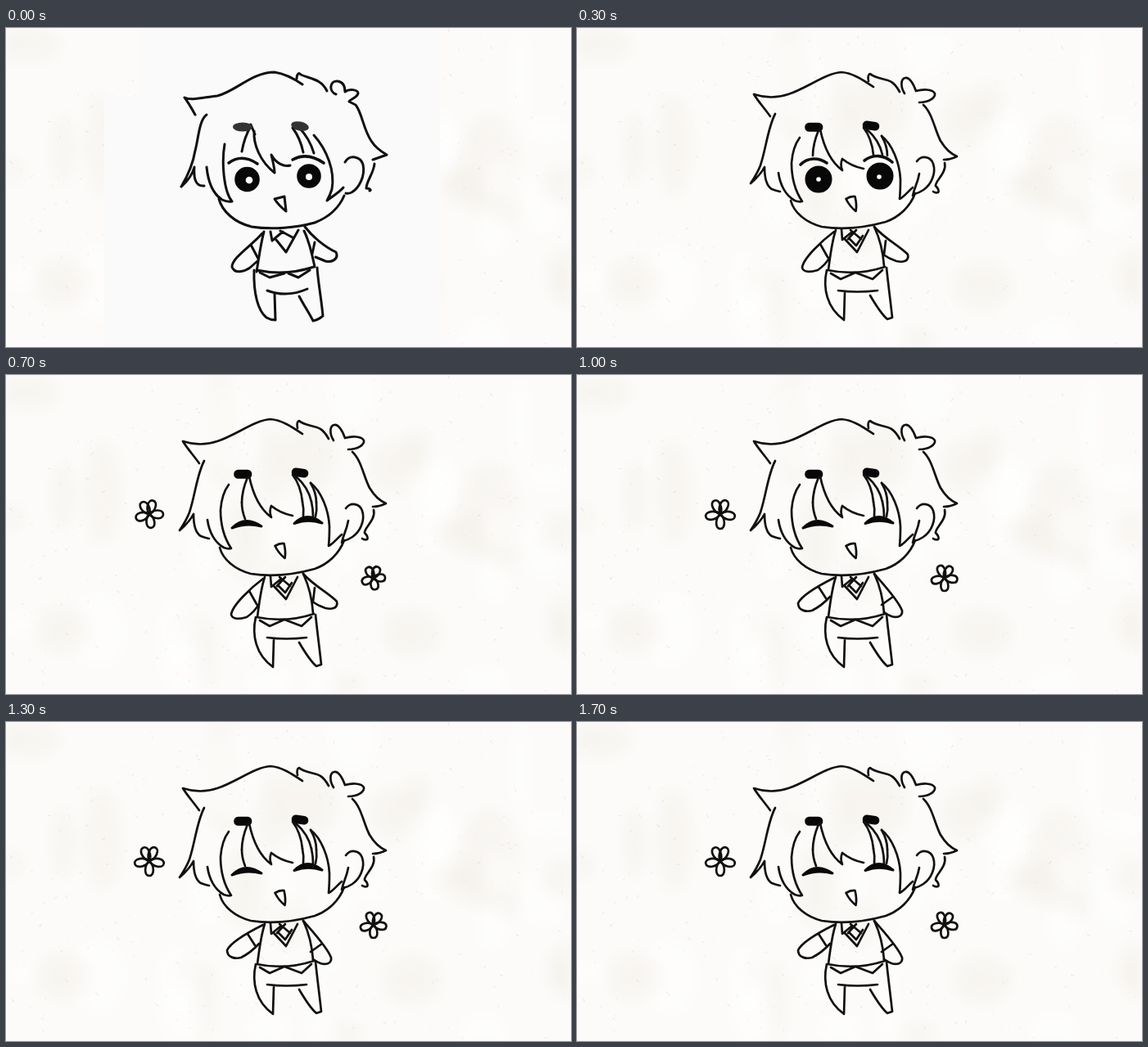
Write an HTML page that moves like this. It is 690x390 px and loops after 1800 ms.

```html
<!DOCTYPE html>
<html lang="en">
<head>
<meta charset="utf-8">
<title>Waving chibi</title>
<style>
  html, body { margin: 0; width: 100%; height: 100%; overflow: hidden; background: #fcfbf9; }
  svg { display: block; width: 690px; height: 390px; }
  #ink { fill: none; stroke: #101010; stroke-width: 2.7; stroke-linecap: round; stroke-linejoin: round; filter: url(#soft); }
  #rough { stroke-width: 3; }
  .solid { fill: #080808; stroke: #080808; stroke-width: 1.6; }
  .lid { stroke-width: 3.6; }
  .glint { fill: #fcfbf9; stroke: none; }
  .brow { fill: #333; stroke: none; }
  #ink [data-part] { display: none; }
  #clean { fill: #fafafa; }
</style>
</head>
<body>
<svg viewBox="0 0 690 390">
  <defs>
    <filter id="soft" x="0" y="0" width="690" height="390" filterUnits="userSpaceOnUse">
      <feGaussianBlur stdDeviation=".75"/>
    </filter>
    <filter id="haze" x="0" y="0" width="690" height="390" filterUnits="userSpaceOnUse">
      <feGaussianBlur stdDeviation="9"/>
    </filter>
  </defs>
  <g id="stains" filter="url(#haze)"></g>
  <g id="paper"></g>
  <path id="clean" d="M162 0H530V390H120V85H162Z"/>
  <g id="ink">

    <!-- rough sketch pose -->
    <g id="rough" data-part="rough">
      <path d="M231 106C226 97 222 90 218 85C226 89 240 85 258 83C280 78 300 54 328 54C341 56 352 62 362 69"/>
      <path d="M355 62C355 56 358 54 360 57C371 62 385 62 392 77"/>
      <path d="M403 81C394 78 395 64 405 65C412 66 414 72 414 78C419 74 430 75 430 80C428 86 420 87 419 90L427 94C435 104 436 123 446 138C451 146 458 151 465 155L448 161"/>
      <path d="M450 166C449 178 440 187 440 196C444 196 447 198 444 199"/>
      <path d="M245 106C236 112 235 135 231 150C228 168 220 184 214 194C222 187 228 178 230 170C229 183 231 194 242 193"/>
      <path d="M245 170C247 190 253 203 264 210Q270 213 276 212C266 200 263 165 267 142"/>
      <path d="M260 209C264 224 279 238 300 243C325 247 355 244 377 238C395 231 407 219 413 205"/>
      <path d="M414 164C420 154 433 157 436 167C439 181 431 196 422 201Q418 203 415 202"/>
      <path d="M376 131C392 149 402 175 398 197Q396 204 392 211C400 205 408 200 412 195"/>
      <path d="M299 118L304 130M303 126C302 142 310 163 328 177C328 170 325 160 324 155C330 166 340 170 347 168"/>
      <path d="M299 120C293 130 290 140 288 151M350 122C358 133 361 142 363 152M358 122C368 132 373 143 376 153"/>
      <ellipse class="brow" cx="289" cy="121" rx="12" ry="5.5"/>
      <ellipse class="brow" cx="359" cy="120" rx="11" ry="5.5" transform="rotate(12 359 120)"/>
      <path class="lid" d="M272 165Q288 153 307 166M350 161Q368 151 388 165"/>
      <circle class="solid" cx="294.500" cy="185" r="14.500"/>
      <circle class="solid" cx="370" cy="181" r="14"/>
      <circle class="glint" cx="297" cy="186" r="4.300"/>
      <circle class="glint" cx="370" cy="182" r="4"/>
      <path d="M328 209L340 206L342 224Q333 217 328 209Z"/>
      <path d="M323 249L325 260L338 249M330 259L342 274L357 247M335 248L350 256"/>
      <path d="M315 249C311 264 309 280 306 298M364 248C371 262 374 278 377 292M306 296C330 301 355 299 376 292"/>
      <path d="M310 299L322 305L340 300M345 300L357 305L371 296"/>
      <path d="M313 251C300 266 276 281 276 292C279 301 291 298 298 293L307 285M299 265L308 282"/>
      <path d="M365 243C375 256 390 268 403 274C407 283 397 287 390 285L378 280M377 262L374 276"/>
      <path d="M303 296C302 325 308 346 318 354Q323 357 329 357L328 325M319 321C335 327 352 326 368 319"/>
      <path d="M358 328C365 341 371 350 375 358Q381 357 387 352C385 330 381 310 380 293"/>
    </g>

    <!-- clean figure -->
    <g data-part="figure">
      <path d="M236 108C228 97 220 88 216 81C228 85 244 86 258 81C280 74 304 55 323 54C337 55 350 64 362 72"/>
      <path d="M356 65C355 60 355 57 358 56C364 62 378 62 384 66Q389 69 394 78"/>
      <path d="M400 80C395 72 395 62 401 61C407 60 411 69 414 77C421 75 434 74 437 80C438 85 430 91 418 91"/>
      <path d="M423 94C434 104 437 125 444 138C450 148 457 154 464 157Q456 161 448 161M449 165C452 177 437 187 438 193Q443 198 441 201Q438 202 435 200"/>
      <path d="M242 105C233 122 231 147 224 168C221 176 216 184 212 190C219 184 226 176 229 170C229 182 231 193 238 197Q243 199 248 200"/>
      <path d="M246 177C248 192 255 205 266 211Q271 213 275 212C267 200 262 185 262 165C263 152 266 142 272 134"/>
      <path d="M261 211C265 226 280 238 299 243C325 247 352 244 377 237C394 231 407 218 413 202"/>
      <path d="M415 163C421 155 432 157 435 166C439 178 432 192 423 198Q417 202 412 203M418 178C416 190 412 195 410 205"/>
      <path d="M372 132C385 142 394 165 395 185Q395 199 394 209C400 206 404 200 410 195"/>
      <rect class="solid" x="279" y="116.500" width="20.500" height="9.500" rx="4.500"/>
      <rect class="solid" x="349.500" y="115" width="19" height="9" rx="4.300" transform="rotate(8 359 119.500)"/>
      <path d="M328.500 209Q334 205.500 339.500 206Q342 216 340.500 224Q333 218 328.500 209Z"/>
      <path d="M323 246L324 259L335 250M327 258L342 274L356 247M332 257L341 266L349 254M334 247L347 258M341 247L331 258"/>
      <path d="M316 247C311 262 309 280 307 296M363 243C370 258 374 276 375 291M306 296C330 301 355 299 376 292"/>
      <path d="M310 300L322 307L340 299L361 307L373 296"/>
      <path d="M305 296C300 318 305 342 326 357L327 324M319 321Q342 324 367 321"/>
      <path d="M358 327C365 339 372 350 379 356L385 354C383 335 380 313 378 293"/>
    </g>

    <!-- fringe -->
    <path data-part="fringeA" d="M297 124C301 143 309 163 324 175Q321 168 324 160Q331 168 341 169M297 124C293 133 288 142 287 152M350 122C356 130 361 142 363 153M352 123C362 130 368 145 369 156M372 134C376 140 378 148 376 156"/>
    <path data-part="fringe" d="M297 124C301 143 309 163 324 174Q321 167 324 160Q335 169 350 172M295 125Q288 142 288 156M350 122Q360 135 362 155M354 124Q369 137 373 155M372 132Q379 144 379 156"/>
    <path data-part="strands" d="M288 156Q288 166 292 176M362 155Q364 164 363 173M373 155Q375 164 375 173M379 156Q380 165 378 173"/>

    <!-- eyes -->
    <g data-part="open">
      <path class="lid" d="M273 167C282 158 295 158 305 165M351 162C362 154 375 155 385 164"/>
      <circle class="solid" cx="295" cy="185" r="15.700"/>
      <circle class="solid" cx="370" cy="181" r="15.700"/>
      <circle class="glint" cx="295" cy="185" r="2.800"/>
      <circle class="glint" cx="369" cy="182" r="2.800"/>
    </g>
    <g data-part="half">
      <path class="lid" d="M273 180L312 179M352 176.500L388 176"/>
      <path class="solid" d="M279 180H311L310 193Q295 195 280 193ZM354 177H386L385 189Q370 191 355 189Z"/>
      <circle class="glint" cx="296" cy="184.500" r="2.800"/>
      <circle class="glint" cx="369" cy="181.500" r="2.800"/>
    </g>
    <path data-part="shut" class="solid" style="stroke-width:3" d="M276 187Q292 171 312 185Q294 180 276 187ZM352 181.500Q368 166 386 181Q369 175.500 352 181.500Z"/>

    <!-- arms -->
    <path data-part="armsOut" d="M314 249C299 260 276 282 275 293C277 300 287 298 294 296Q304 289 308 281M297 264L306 280M363 243C375 257 396 268 404 277C406 285 398 287 390 285Q381 282 374 277M377 260L375 277"/>
    <path data-part="armDown" d="M363 243C375 257 392 275 397 288C398 296 390 297 384 295Q379 293 375 290M372 281L386 271"/>
    <path data-part="waveLow" d="M314 248C300 255 275 268 270 279C270 288 280 290 287 288Q299 282 309 271M295 259L304 273"/>
    <path data-part="waveHigh" d="M314 249C300 247 280 244 267 247C261 252 264 262 269 264C282 268 298 268 311 268M294 249V267"/>
  </g>
</svg>
<script>
  const ink = document.getElementById('ink');

  function add(parent, tag, attrs) {
    const el = document.createElementNS('http://www.w3.org/2000/svg', tag);
    for (const k in attrs) el.setAttribute(k, attrs[k]);
    return parent.appendChild(el);
  }

  // Faint stains and fibres in the paper
  let seed = 11;
  const rnd = () => (seed = seed * 16807 % 2147483647) / 2147483647;
  const stains = document.getElementById('stains');
  const paper = document.getElementById('paper');
  for (let i = 0; i < 50; i++) {
    add(stains, 'ellipse', {
      cx: rnd() * 690, cy: rnd() * 390, rx: 10 + rnd() * 25, ry: 15 + rnd() * 45,
      fill: i % 2 ? '#fff' : '#f3f0ea', opacity: 0.5
    });
  }
  for (let i = 0; i < 240; i++) {
    const dx = rnd() * 8 - 4, dy = rnd() * 8 - 4;
    add(paper, 'path', {
      d: `M${rnd() * 690} ${rnd() * 390}q${dx} ${dy / 3} ${dx} ${dy}`,
      fill: 'none', stroke: '#8a8272', 'stroke-width': 0.9, opacity: 0.06 + rnd() * 0.16
    });
  }

  // One flower: a looped petal per angle
  function flower(part, x, y, len, wide, angles) {
    const g = add(ink, 'g', { 'data-part': part });
    const petal = `M0 0C${len * 0.3} ${-wide} ${len} ${-wide} ${len} 0C${len} ${wide} ${len * 0.3} ${wide} 0 0`;
    for (const a of angles) add(g, 'path', { d: petal, transform: `translate(${x} ${y}) rotate(${a})` });
  }

  const leftA = [-115, -66, 10, 90, 170], rightA = [-112, -58, 8, 88, 165];
  const turn = (list, by) => list.map(a => a + by);
  flower('bud', 172, 171.5, 8, 4, [-90, 0, 90, 180]);
  flower('bud', 449, 251, 9, 4.5, [-130, -45, 20, 65, 140]);
  flower('bloom', 175, 170, 17, 6.5, turn(leftA, -8));
  flower('bloom', 448.5, 248, 14.5, 6, turn(rightA, -8));
  flower('flowerA', 175, 170, 18, 6.5, leftA);
  flower('flowerA', 448.5, 248, 16, 6, rightA);
  flower('flowerB', 177, 170.5, 18.5, 7, [-98, -25, 42, 108, 182]);
  flower('flowerB', 449, 247.5, 16.5, 6, [-80, -8, 52, 128, 200]);

  const smile = 'figure fringe strands shut ';
  const low = smile + 'armDown waveLow flowerA';
  const high = smile + 'armDown waveHigh flowerB';
  const steps = [
    [0, 'rough'],
    [200, 'figure fringeA open armsOut'],
    [300, 'figure fringe open armsOut'],
    [500, 'figure fringe strands half armsOut bud'],
    [700, smile + 'armsOut bloom'],
    [1000, low], [1200, high], [1300, low], [1500, high], [1700, low]
  ];

  const parts = [...ink.querySelectorAll('[data-part]')];
  const clean = document.getElementById('clean');
  const start = performance.now();
  let shown = null;

  function draw(now) {
    const t = Math.max(0, now - start) % 1800;
    const step = steps.findLast(s => s[0] <= t);
    if (step !== shown) {
      shown = step;
      const on = step[1].split(' ');
      for (const p of parts) p.style.display = on.includes(p.dataset.part) ? 'inline' : 'none';
      clean.style.display = on[0] === 'rough' ? 'inline' : 'none';
    }
    requestAnimationFrame(draw);
  }
  draw(start);
</script>
</body>
</html>
```
